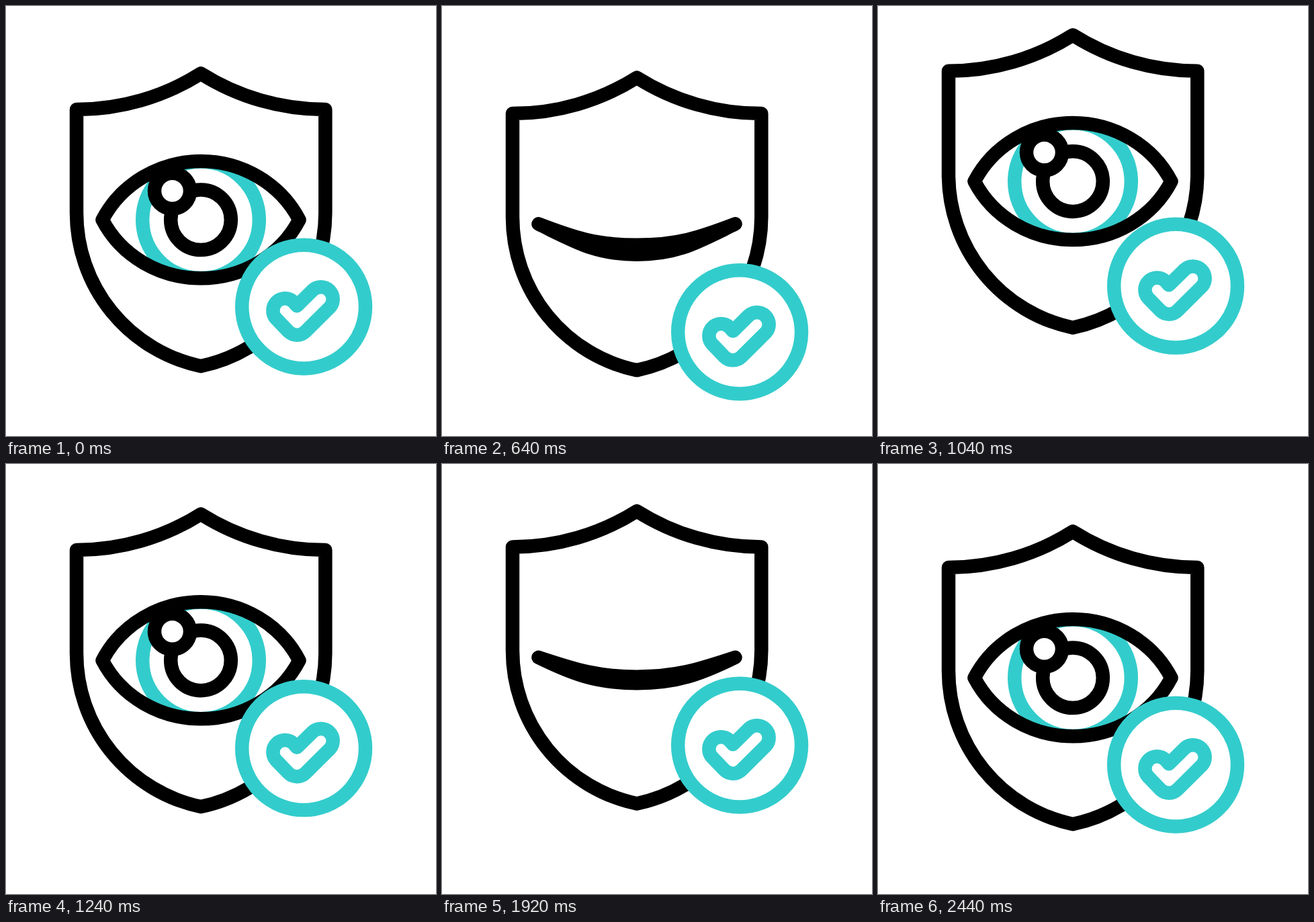
These frames come from a looping animation (640x640 px, 2.6 s). An HTML page:

```html
<!DOCTYPE html>
<html lang="en">
<head>
<meta charset="utf-8">
<title>Shield with blinking eye</title>
<style>
  html, body { margin: 0; width: 100%; height: 100%; overflow: hidden; background: #fff; }
  svg { display: block; width: 100%; height: 100%; }
  g { fill: none; stroke: #000; stroke-width: 20.5; stroke-linejoin: round; }
  .cyan { stroke: #33cccc; }
  .white { fill: #fff; }
</style>
</head>
<body>
<svg viewBox="0 0 640 640">
  <clipPath id="opening"><path class="lids"/></clipPath>
  <g id="shield">
    <path d="M290 100.5A346 346 0 0 1 105 154V308A233 233 0 0 0 290 536A233 233 0 0 0 475.3 308V154A346 346 0 0 1 290 100.5Z"/>
    <g transform="translate(290 318.3)">
      <g clip-path="url(#opening)">
        <circle class="cyan" r="86.8"/>
        <circle r="44.8"/>
        <circle class="white" cx="-42.5" cy="-43" r="26.5"/>
      </g>
      <path class="lids"/>
    </g>
  </g>
  <g id="badge" class="cyan">
    <circle class="white" cx="443.1" cy="447.6" r="91.9"/>
    <path d="M433 446.2L427.2 439.8A18 18 0 0 0 401.8 465.2L420.3 484.4A18 18 0 0 0 445.7 484.4L482.2 448.2A18 18 0 0 0 456.8 422.8Z"/>
  </g>
</svg>
<script>
const LOOP = 2600, STEP = 40;

// Keys are [time in ms, value]
const shieldKeys = [[160, 0], [560, 14], [960, -62], [1360, -16], [1760, -47], [2160, 0]];
const badgeKeys = [[320, 0], [720, 42], [1120, -39.4], [1520, 30], [1920, -29], [2320, 0]];
const blinkKeys = [[160, 0], [560, 1], [960, 0], [1640, 0], [2040, 1], [2440, 0]];

const shield = document.getElementById('shield');
const badge = document.getElementById('badge');
const lids = document.querySelectorAll('.lids');

const mix = (a, b, p) => a + (b - a) * p;
const ease = u => u * u * (3 - 2 * u);

function valueAt(keys, t) {
  if (t <= keys[0][0]) return keys[0][1];
  for (let i = 1; i < keys.length; i++) {
    const [t0, a] = keys[i - 1], [t1, b] = keys[i];
    if (t < t1) return mix(a, b, ease((t - t0) / (t1 - t0)));
  }
  return keys[keys.length - 1][1];
}

function lidPath(p) {
  const w = 146.5, k = 61;
  const top = mix(-87.2, 60.8, p), topX = w - mix(28, 60, p), topY = mix(-54, 37, p);
  const low = mix(87, 25, p), lowX = w - mix(28, 56, p), lowY = mix(54, 16.3, p);
  return `M${-w} 0C${-topX} ${topY} ${-k} ${top} 0 ${top}S${topX} ${topY} ${w} 0` +
         `C${lowX} ${lowY} ${k} ${low} 0 ${low}S${-lowX} ${lowY} ${-w} 0Z`;
}

function draw(t) {
  shield.setAttribute('transform', `translate(0 ${valueAt(shieldKeys, t)})`);
  badge.setAttribute('transform', `translate(0 ${valueAt(badgeKeys, t)})`);
  const d = lidPath(valueAt(blinkKeys, t));
  lids.forEach(lid => lid.setAttribute('d', d));
}

const start = performance.now();
function tick() {
  const t = (performance.now() - start) % LOOP;
  draw(Math.floor(t / STEP) * STEP);
  requestAnimationFrame(tick);
}
tick();
</script>
</body>
</html>
```
